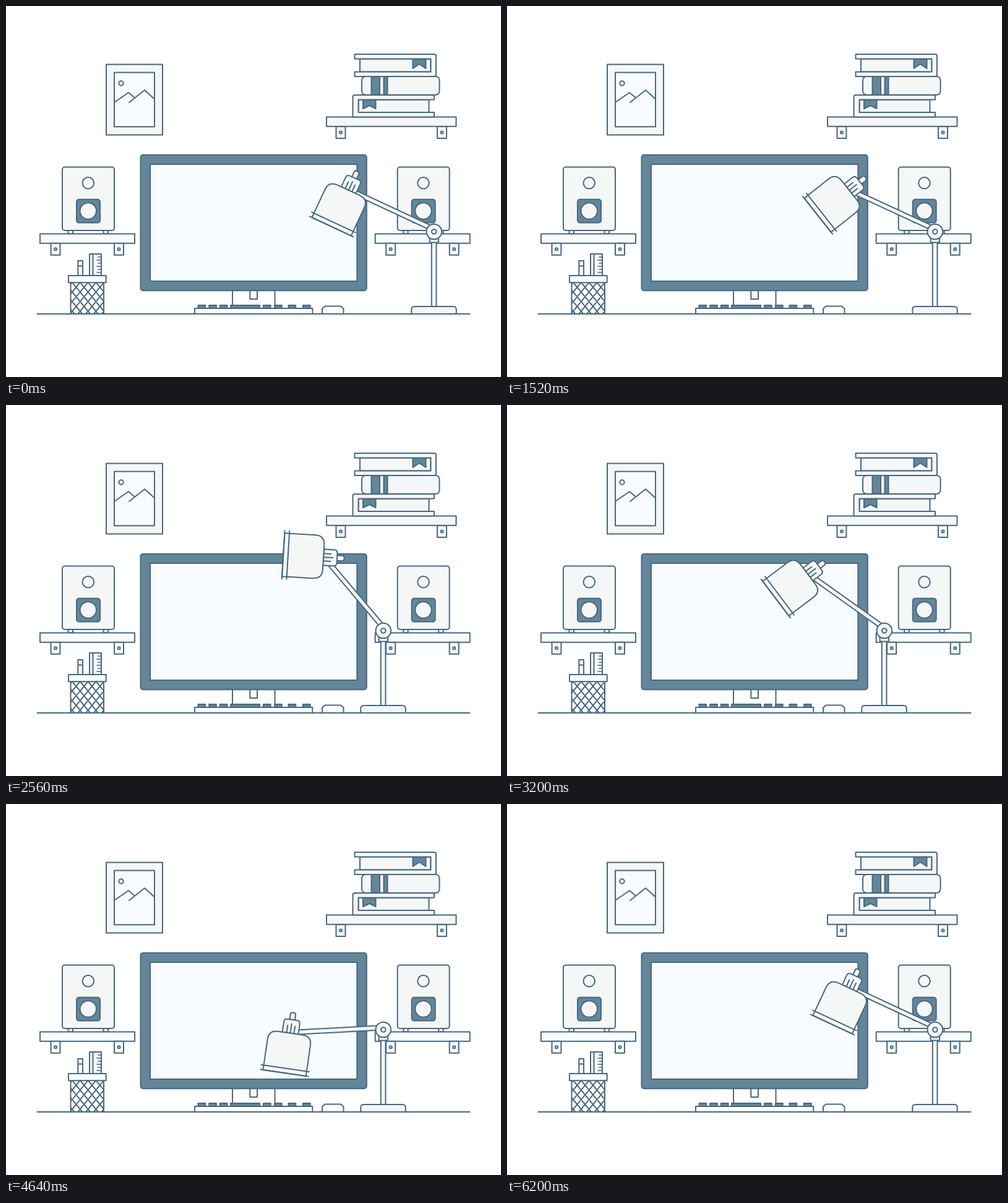
Recreate the animation shown at these times as an HTML page. Size 800 by 600 pixels, loop 7040 ms.

```html
<!DOCTYPE html>
<html lang="en">
<head>
<meta charset="utf-8">
<title>Desk lamp</title>
<style>
  html, body { margin: 0; width: 100%; height: 100%; overflow: hidden; background: #fff; }
  svg { display: block; width: 100%; height: 100%; }
  .ink { fill: #f5f7f7; stroke: #4a687f; stroke-width: 2; stroke-linejoin: round; stroke-linecap: round; }
  .dark { fill: #638699; }
  .pale { fill: #f8fcff; }
  .white { fill: #fff; }
  .line { fill: none; }
</style>
</head>
<body>
<svg viewBox="0 0 800 600">
  <defs>
    <g id="bracket">
      <rect x="-7.5" width="15" height="19"/>
      <circle cy="9.5" r="2"/>
    </g>
    <g id="speaker">
      <rect x="100.5" y="363" width="7.5" height="5.5"/>
      <rect x="157.5" y="363" width="7.5" height="5.5"/>
      <rect x="91" y="260.5" width="84" height="102.5" rx="4"/>
      <circle cx="132.8" cy="286.3" r="9.3"/>
      <rect class="dark" x="114" y="312.8" width="38" height="37.8" rx="4"/>
      <circle cx="132.8" cy="331.5" r="13.2"/>
      <rect class="pale" x="55" y="368.5" width="153" height="15.3"/>
      <use href="#bracket" x="80" y="383.8"/>
      <use href="#bracket" x="182.5" y="383.8"/>
    </g>
    <clipPath id="basket"><rect x="104.5" y="447" width="53.5" height="51"/></clipPath>
  </defs>

  <g class="ink">
    <!-- picture -->
    <rect x="162" y="94.5" width="91" height="114"/>
    <rect class="pale" x="175" y="107.5" width="65" height="87.8"/>
    <circle cx="186" cy="125" r="3.7"/>
    <path class="line" d="M175.5 155.5 198 140 208 148.5M199 156 224 136 240 150.5"/>

    <!-- books -->
    <rect x="518" y="179.5" width="209.5" height="15.2"/>
    <use href="#bracket" x="541" y="195"/>
    <use href="#bracket" x="704.5" y="195"/>
    <rect x="572" y="85.5" width="114.5" height="21"/>
    <path d="M563.5 78H692q3 0 3 3V111q0 3-3 3H563.5V106.5H686.5V85.5H563.5Z"/>
    <path class="dark" d="M657.5 86H678.5V101L668 94 657.5 101Z"/>
    <rect x="575" y="114" width="125.5" height="29.7" rx="6"/>
    <path class="dark" d="M590.5 114H604V143.5H590.5ZM610.5 114H616.5V143.5H610.5Z"/>
    <rect x="569.5" y="151.5" width="114" height="20.5"/>
    <path d="M692 144H563.5q-3 0-3 3V179.5H692V172H569.5V151.5H692Z"/>
    <path class="dark" d="M577 152H597.5V166L587.5 161 577 166Z"/>

    <use href="#speaker"/>
    <use href="#speaker" x="541.7"/>

    <!-- computer -->
    <rect class="white" x="366" y="460" width="68.5" height="29"/>
    <rect class="white" x="394.3" y="460" width="11.7" height="14"/>
    <rect class="dark" x="217.5" y="240.7" width="365.3" height="219.5" rx="4"/>
    <rect class="pale" x="233" y="256" width="334.3" height="189"/>
    <path id="keys" class="dark" d="M363 484h47v5h-47z"/>
    <rect class="white" x="305" y="489" width="190.3" height="9"/>
    <path class="white" d="M511 498V489.5L515.5 485.5H541L545.5 489.5V498Z"/>

    <!-- pen pot -->
    <path d="M116.3 436V412H124V436M116.3 420.5H124"/>
    <rect x="135" y="401" width="19" height="35"/>
    <path class="line" d="M140.5 401V436"/>
    <path id="ticks" class="line" stroke-width="1.5"/>
    <rect class="white" x="104.5" y="447" width="53.5" height="51"/>
    <path id="mesh" class="line" clip-path="url(#basket)"/>
    <rect class="white" x="101" y="436" width="60.7" height="11.2"/>

    <path class="line" d="M50.5 498H749.5"/>

    <!-- lamp, drawn around its joint -->
    <g id="lamp">
      <rect x="-4" y="17" width="7.7" height="106"/>
      <path id="foot" d="M-36.5 133V126q0-5 5-5H31q5 0 5 5V131q0 2-2 2H-34.500q-2 0-2-2Z"/>
      <rect x="-7.3" y="9" width="14.6" height="8.5" rx="2"/>
      <rect id="arm" x="-150" y="-7" width="150" height="7.2"/>
      <g id="head">
        <rect x="-4.2" y="-32.5" width="8.4" height="14" rx="3"/>
        <path d="M-13 1V-16q0-5 5-5H8q5 0 5 5V1Z"/>
        <path class="line" d="M-6 0V-11M0 0V-14M6 0V-11"/>
        <path d="M-35 66V16Q-35 1-20 1H20Q35 1 35 16V66Z"/>
        <path class="line" d="M-39 58.3H39M-39 66H39"/>
      </g>
      <circle r="12.3"/>
      <circle r="3.8"/>
    </g>
  </g>
</svg>
<script>
const LOOP = 7040, STEP = 40;
const el = id => document.getElementById(id);
const addPath = (id, d) => el(id).setAttribute('d', (el(id).getAttribute('d') || '') + d);

for (const x of [310.5, 328.2, 345.8, 416, 434, 456.5, 480]) addPath('keys', `M${x} 484h11.7v5h-11.7z`);
for (let i = 0; i < 6; i++) addPath('ticks', `M154 ${406 + i * 5}h${i % 2 ? -7 : -5}`);
for (let x = 43; x < 220; x += 12.8) addPath('mesh', `M${x} 447l42 51M${x} 447l-42 51`);

const sine = p => (1 - Math.cos(Math.PI * p)) / 2;
const cubicOut = p => 1 - (1 - p) ** 3;
const progress = (t, start, length) => Math.min(1, Math.max(0, (t - start) / length));

// Angles in degrees; reach is the distance from joint to head
const rest = { arm: 25, head: 25, reach: 153.6 };
const look = { ...rest, head: 86 };
const crouch = { arm: -5, head: 3, reach: 150 };
const raised = { arm: 49.8, head: 93.4, reach: 152.5 };
const stretched = { ...raised, arm: 52, head: 97 };

// A lag delays one part's start; all parts of a move end together
const moves = [
  { to: look, at: 400, length: 400 },
  { to: crouch, at: 1200, length: 720, armLag: 300 },
  { to: raised, at: 1920, length: 620, headLag: 140 },
  { to: stretched, at: 2540, length: 220 },
  { to: rest, at: 2760, length: 770 },
  { to: look, at: 3560, length: 440 },
  { to: crouch, at: 4400, length: 400, ease: cubicOut },
  { to: raised, at: 4800, length: 620, headLag: 140 },
  { to: stretched, at: 5440, length: 300 },
  { to: rest, at: 5800, length: 400 },
];

function poseAt(t) {
  const pose = { ...rest };
  for (const { to, at, length, ease = sine, armLag = 0, headLag = 0 } of moves) {
    for (const part in pose) {
      const lag = part === 'head' ? headLag : armLag;
      pose[part] += (to[part] - pose[part]) * ease(progress(t, at + lag, length - lag));
    }
  }
  return pose;
}

function draw(t) {
  const { arm, head, reach } = poseAt(t);
  const left = progress(t, 1920, 400), right = progress(t, 4800, 400);
  const height = 39 * 4 * (left * (1 - left) + right * (1 - right));
  const tilt = 26.5 * (Math.sin(Math.PI * right) - Math.sin(Math.PI * left));
  const set = (id, value) => el(id).setAttribute('transform', value);
  set('lamp', `translate(${691.8 - 82 * (left - right)} ${365 - height})`);
  set('foot', `rotate(${tilt} 0 127)`);
  set('arm', `rotate(${arm})`);
  set('head', `rotate(${arm}) translate(${height * 0.1 - reach} -3.4) rotate(${head - arm})`);
}

const begin = performance.now();
function tick() {
  const t = (performance.now() - begin) % LOOP;
  draw(Math.floor(t / STEP) * STEP);
  requestAnimationFrame(tick);
}
tick();
</script>
</body>
</html>
```
